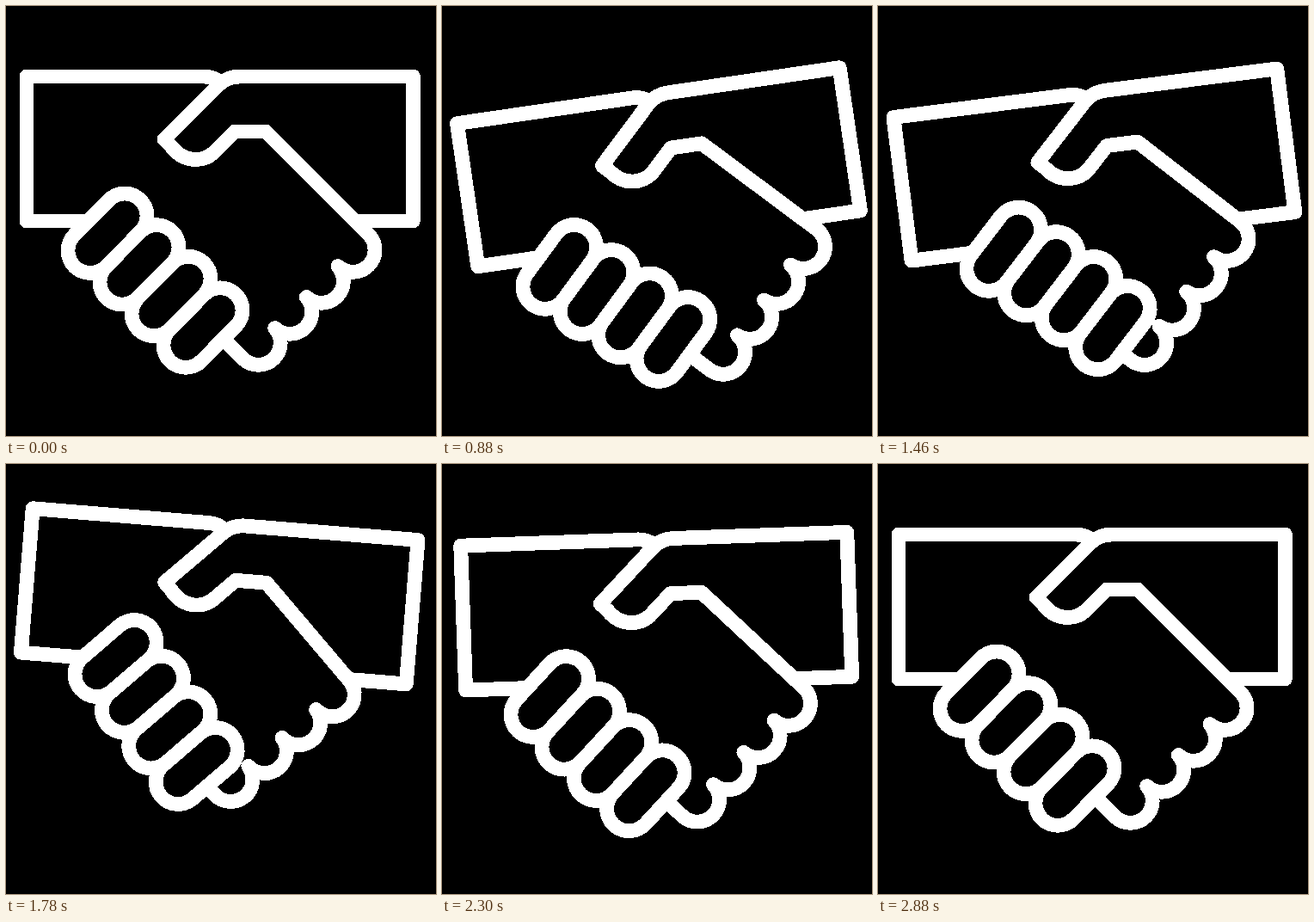
Animation of 500 by 500 pixels, one loop 4 s. Source, as an HTML page:

```html
<!DOCTYPE html>
<html lang="en">
<head>
<meta charset="utf-8">
<title>Handshake</title>
<style>
  html, body { margin: 0; width: 100%; height: 100%; overflow: hidden; background: #000; }
  svg { display: block; width: 100%; height: 100%; }
  path { fill: none; stroke-linecap: round; stroke-linejoin: round; shape-rendering: crispEdges; }
  .outline { stroke: #fff; stroke-width: 16.8; }
  .finger-edge { stroke: #fff; stroke-width: 68.8; }
  .finger-core { stroke: #000; stroke-width: 35.2; }
</style>
</head>
<body>
<svg viewBox="0 0 500 500">
  <g id="hands">
    <path class="outline" d="M95 250H24V82H230Q241 82 249 89"/>
    <path class="outline" d="M408 250H473.4V82H272Q258 82 248 91L184 155L192 163C206 182 228 182 241 171L266 146H302"/>
    <path class="outline" id="rightFingers"/>
  </g>
</svg>
<script>
const LOOP = 4000;
const PIVOT = '397 154';
const SVG_NS = 'http://www.w3.org/2000/svg';
const hands = document.getElementById('hands');
const rightFingers = document.getElementById('rightFingers');

// Keys are [time in ms, value], joined by straight lines.
const swingKeys = [[572, 0], [1201, -16.9], [1818, 6.07], [2360, -3], [2880, 0]];
const rightKeys = [[786, 0], [1666, 23.4], [2565, 0]];

function sample(keys, t) {
  if (t <= keys[0][0]) return keys[0][1];
  for (let i = 1; i < keys.length; i++) {
    const [t0, v0] = keys[i - 1], [t1, v1] = keys[i];
    if (t < t1) return v0 + (v1 - v0) * (t - t0) / (t1 - t0);
  }
  return keys[keys.length - 1][1];
}

function addElement(parent, tag, attributes = {}) {
  const element = document.createElementNS(SVG_NS, tag);
  for (const name in attributes) element.setAttribute(name, attributes[name]);
  return parent.appendChild(element);
}

// The left hand's fingers slide one after another, the lowest one first.
const leftFingers = [0, 1, 2, 3].map(i => {
  const group = addElement(hands, 'g');
  const d = `M${138 + 37 * i} ${244 + 36.6 * i}l-40 40.5`;
  addElement(group, 'path', { class: 'finger-edge', d });
  addElement(group, 'path', { class: 'finger-core', d });
  const lag = 3 - i;
  const keys = [[572 + 126 * lag, 0], [1370 + 96 * lag, 27.6], [2160 + 91 * lag, 0]];
  return { group, keys };
});

// A chain of four half circles that slides along the edge of the hand.
function rightFingerPath(slide) {
  const shift = slide * Math.SQRT1_2;
  const halfCircle = 'a25.7 25.7 0 0 1 -36.6 36 ';
  return `M302 146L${422.5 - shift} ${266.5 - shift}${halfCircle.repeat(4)}l-26 -26`;
}

function draw() {
  const t = performance.now() % LOOP;
  hands.setAttribute('transform', `rotate(${sample(swingKeys, t)} ${PIVOT})`);
  rightFingers.setAttribute('d', rightFingerPath(sample(rightKeys, t)));
  for (const { group, keys } of leftFingers) {
    const shift = sample(keys, t) * Math.SQRT1_2;
    group.setAttribute('transform', `translate(${shift} ${-shift})`);
  }
  requestAnimationFrame(draw);
}
draw();
</script>
</body>
</html>
```
